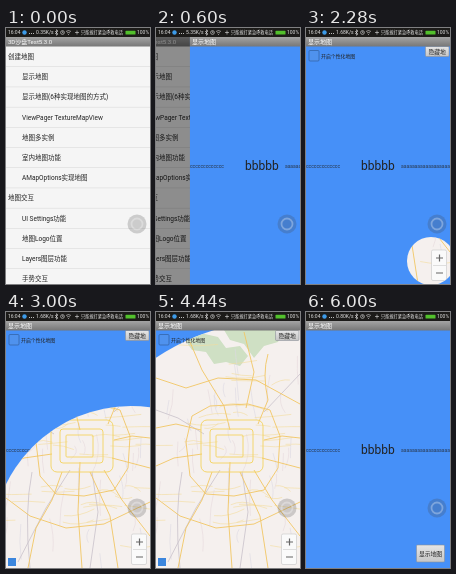
These frames come from a looping animation (144x256 px, 6.12 s). An HTML page:

```html
<!DOCTYPE html>
<html lang="zh">
<head>
<meta charset="utf-8">
<title>Map reveal</title>
<style>
html, body { margin: 0; width: 100%; height: 100%; overflow: hidden; background: #fff; }
svg { display: block; width: 100vw; height: 100vh; }
text { font: 6.5px Roboto, "Noto Sans CJK SC", "Noto Sans CJK", sans-serif; fill: #222; }
.title { font-size: 6px; fill: #fff; }
.status text { font-size: 5px; fill: #e4e4e4; }
.status .carrier { font-size: 4.2px; }
.small { font-size: 5px; }
.label { font-size: 5.8px; }
.road { fill: none; stroke-linejoin: round; }
</style>
</head>
<body>
<svg viewBox="0 0 144 256" preserveAspectRatio="none">
  <defs>
    <linearGradient id="bar" x2="0" y2="1">
      <stop stop-color="#a4a4a4"/><stop offset="1" stop-color="#777"/>
    </linearGradient>
    <linearGradient id="key" x2="0" y2="1">
      <stop stop-color="#e6e6e6"/><stop offset="1" stop-color="#c6c6c6"/>
    </linearGradient>
    <clipPath id="hole"><circle id="reveal" cx="125" cy="233" r="0"/></clipPath>
  </defs>

  <g id="list">
    <rect width="144" height="256" fill="#f5f5f5"/>
    <g id="rows"></g>
    <rect y="9" width="144" height="9.5" fill="url(#bar)"/>
    <text class="title" x="2" y="16">3D沙盘Test5.3.0</text>
  </g>
  <rect id="dim" width="144" height="256" opacity="0"/>

  <g id="page">
    <rect width="144" height="256" fill="#4690f8"/>
    <text class="small" x="0" y="139.5" fill-opacity=".8">ccccccccccccc</text>
    <text x="55" y="142" style="font-size:12px">bbbbb</text>
    <text class="small" x="95" y="139.5" fill-opacity=".8">aaaaaaaaaaaaaaaaaaaa</text>
    <g id="show">
      <rect x="110.5" y="233" width="28" height="17" rx="1" fill="url(#key)" stroke="#8b9199" stroke-width=".6"/>
      <text class="label" x="124.5" y="244" text-anchor="middle">显示地图</text>
    </g>
    <g id="map" clip-path="url(#hole)">
      <rect width="144" height="256" fill="#f5f0ee"/>
      <g fill="#cfe0c4">
        <path d="M26 24L40 20 62 25 70 36 84 34 92 44 84 54 70 50 58 52 50 40 36 38Z"/>
        <path d="M68 18H128L122 30 108 34 98 46 88 32 74 28Z"/>
      </g>
      <g id="lanes" class="road" stroke-width=".6"></g>
      <g class="road" stroke="#c9c2cb" stroke-width=".8">
        <path d="M0 98L22 106 48 122M64 158L40 196 12 250M26 160Q18 200 24 256M86 160L92 200 84 256M108 100L144 62"/>
      </g>
      <g class="road" stroke="#f2c765" stroke-width=".9">
        <path d="M34 30L46 58 68 94 74 118M112 42Q106 62 112 88L102 112M90 96L98 60 88 20"/>
        <path d="M45 118L20 112 0 116M46 142L18 146 0 154M108 128L126 124 144 126M106 146L144 156"/>
        <path d="M56 160L46 188 30 216 22 256M74 150L72 200 76 256M98 158L116 188 144 224M84 160L104 204 112 256"/>
        <path d="M36 104L30 130 34 164 50 182 78 184 108 178 122 156 124 124 114 98 92 92 54 94Z"/>
        <path d="M0 186L24 204 60 216 98 212 144 190M0 66L30 76 62 66 100 68 144 92"/>
      </g>
      <g class="road" stroke="#f4d35e" stroke-width=".9">
        <rect x="60" y="123" width="27" height="22" rx="1"/>
        <rect x="54" y="117" width="43" height="34" rx="3"/>
        <rect x="45" y="108" width="62" height="52" rx="6"/>
      </g>
      <rect x="2" y="246" width="8" height="8" fill="#3c86dd"/>
      <rect x="125.5" y="222" width="15" height="30.5" rx="1.5" fill="#fafafa" stroke="#c6c6c6" stroke-width=".6"/>
      <path d="M127 237.5H140" stroke="#ccc" stroke-width=".6"/>
      <path d="M130 230H137M133.5 226.5V233.5M130 245H137" stroke="#666" stroke-width="1.2"/>
    </g>
    <g id="tools">
      <rect x="3" y="22.5" width="10" height="10.5" rx="1" fill="#6b96d0" fill-opacity=".25" stroke="#315f9f" stroke-width=".7"/>
      <text class="small" x="15" y="29.8" style="font-size:4.9px">开启个性化地图</text>
      <rect x="119.5" y="18.5" width="23.5" height="10" rx="1" fill="url(#key)" stroke="#8b9199" stroke-width=".6"/>
      <text class="label" x="131.2" y="25.8" text-anchor="middle">隐藏地</text>
    </g>
    <rect y="9" width="144" height="9.5" fill="url(#bar)"/>
    <text class="title" x="2" y="16">显示地图</text>
  </g>

  <g fill="none">
    <circle cx="131" cy="196" r="9.5" fill="#444" fill-opacity=".23"/>
    <circle cx="131" cy="196" r="5.5" stroke="#fff" stroke-opacity=".3" stroke-width="1.8"/>
  </g>

  <g class="status">
    <rect width="144" height="9" fill="#1c1b19"/>
    <text x="2" y="6.3">16:04</text>
    <circle cx="18.5" cy="4.5" r="2.2" fill="#3d9be8"/>
    <path d="M23 5.5H28" stroke="#bbb" stroke-dasharray="1 1"/>
    <text id="speed" x="30" y="6.3"></text>
    <g class="road" stroke="#ddd" stroke-width=".6">
      <path d="M49 3L52 6 50.5 7.3V1.7L52 3 49 6"/>
      <circle cx="56.5" cy="4.5" r="1.9"/>
      <path d="M56.5 3.3V4.7H57.5M60 3.5Q62.5 1.5 65 3.5M61 5Q62.5 3.8 64 5M62.5 6V7"/>
      <path d="M69 4.5H73M71 2.5V6.5"/>
    </g>
    <text class="carrier" x="75" y="6.2">只能拨打紧急呼救电话</text>
    <rect x="119.5" y="2.8" width="10" height="3.7" rx=".6" fill="#52c02c"/>
    <text x="131" y="6.3">100%</text>
  </g>
</svg>
<script>
const $ = id => document.getElementById(id);
const LOOP = 6120, STEP = 120, FULL = 264;
const OPEN = 2040, CLOSED = 5640;
const speeds = [[5640, "0.80K/s"], [1560, "1.68K/s"], [480, "5.35K/s"], [0, "0.35K/s"]];
const clamp = v => Math.min(1, Math.max(0, v));
const phase = (t, start, length) => clamp((t - start) / length);

function add(parent, tag, attrs, text = "") {
  const el = document.createElementNS("http://www.w3.org/2000/svg", tag);
  for (const k in attrs) el.setAttribute(k, attrs[k]);
  el.textContent = text;
  parent.append(el);
}

// A leading "#" marks a section heading.
["#创建地图", "显示地图", "显示地图(6种实现地图的方式)", "ViewPager TextureMapView",
 "地图多实例", "室内地图功能", "AMapOptions实现地图", "#地图交互",
 "UI Settings功能", "地图Logo位置", "Layers图层功能", "手势交互"].forEach((name, i) => {
  const y = 28.5 + i * 20.2, head = name[0] === "#";
  add($("rows"), "text", { x: head ? 2 : 16, y: y + 2.4 }, head ? name.slice(1) : name);
  add($("rows"), "rect", { y: y + 10, width: 144, height: .5, fill: "#d4d4d4" });
});

// Minor roads: slightly bent, mostly axis-aligned, denser near the centre.
let seed = 17;
const rnd = () => (seed = seed * 16807 % 2147483647) / 2147483647;
const spread = size => (rnd() + rnd() - 1) * size;
const colors = ["#e6d8dc", "#f3dc9c", "#dcd8e2", "#f3dc9c"];
for (let i = 0; i < 90; i++) {
  const x = 66 + spread(100), y = 134 + spread(120), len = 12 + rnd() * 30;
  const a = spread(7), b = spread(7);
  const d = i % 2 ? `q${len / 2} ${a} ${len} ${b}` : `q${a} ${len / 2} ${b} ${len}`;
  add($("lanes"), "path", { d: `M${x} ${y}${d}`, stroke: colors[i % 4] });
}

function draw(t) {
  const left = (1 - phase(t, 300, 583)) ** 2;
  $("page").setAttribute("transform", `translate(${144 * left})`);
  $("list").setAttribute("transform", `translate(${-34 * (1 - left)})`);
  $("dim").setAttribute("opacity", .56 * (1 - left));

  const grow = phase(t, 1768, 1698) ** 2, shrink = phase(t, 3733, 1843) ** 2;
  const open = t >= OPEN && t < CLOSED;
  $("reveal").setAttribute("r", open ? FULL * (grow - shrink) : 0);
  $("map").style.display = $("tools").style.display = open ? "" : "none";
  $("show").style.display = open ? "none" : "";
  $("speed").textContent = speeds.find(s => t >= s[0])[1];
}

const start = performance.now();
function tick() {
  const t = (performance.now() - start) % LOOP;
  draw(Math.floor(t / STEP) * STEP);
  requestAnimationFrame(tick);
}
tick();
</script>
</body>
</html>
```
